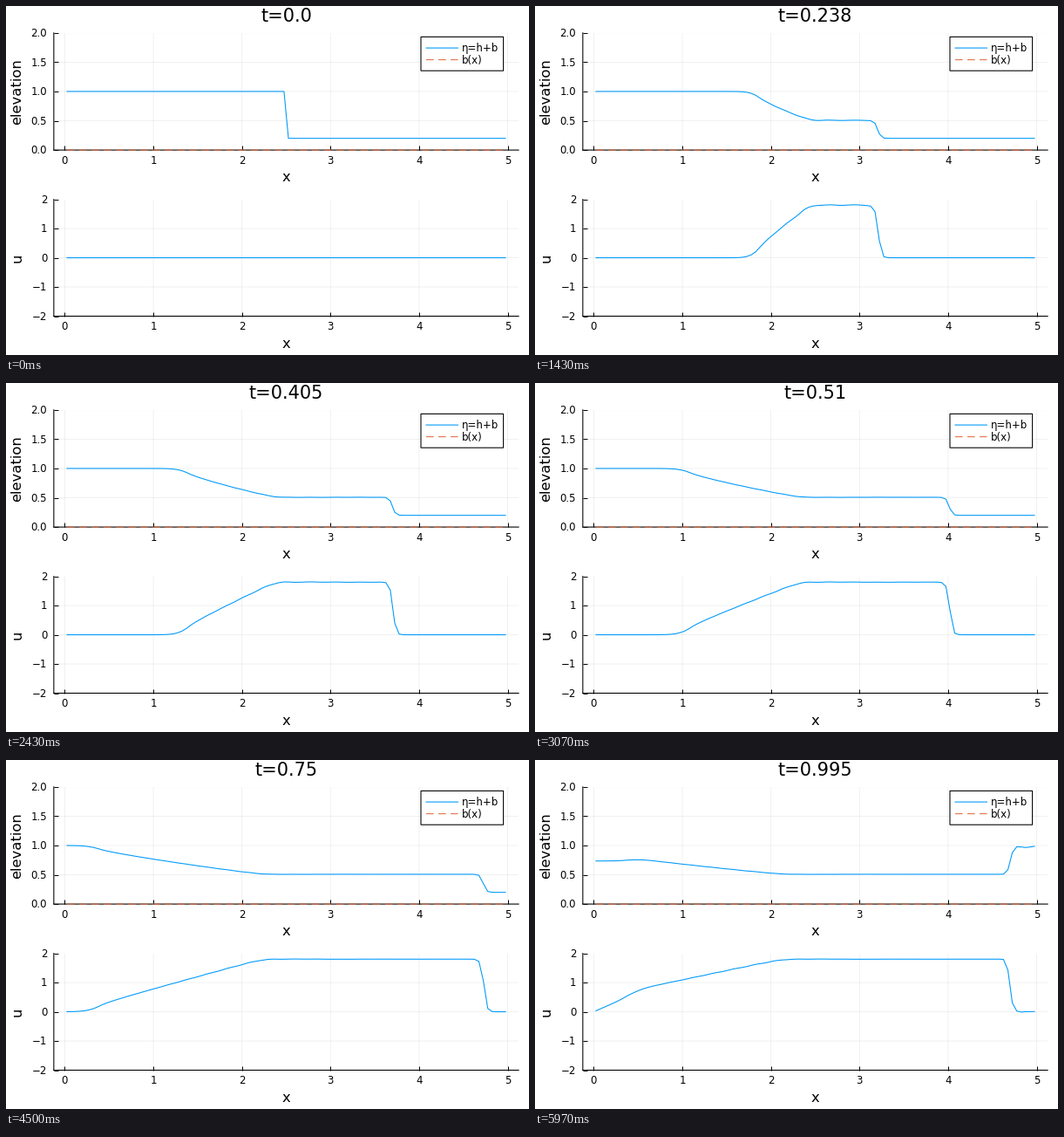
Write a matplotlib script that moves like this. It is 600 px wide and 400 px high and loops after 6010 ms.

```python
import numpy as np
import matplotlib.pyplot as plt
from matplotlib.animation import FuncAnimation
from matplotlib.patches import Rectangle

W, H, DPI = 600, 400, 100
FRAMES, LOOP_MS = 180, 6010
G, CFL, N, LENGTH = 9.81, 0.45, 100, 5.0
BLUE, ORANGE, DASH = "#009AFA", "#E36F47", (8, 5)
PX = 72 / DPI
LINE = 1.08 * PX
TICK, LABEL, TITLE = 11.8 * PX, 16.4 * PX, 20.9 * PX
LEFT, RIGHT = 54.85, 588.1

plt.rcParams["font.family"] = "DejaVu Sans"
dx = LENGTH / N
x = (np.arange(N) + 0.5) * dx


def minmod(a, b):
    return np.where(a * b > 0, np.sign(a) * np.minimum(abs(a), abs(b)), 0)


def flux(q):
    h, m = q
    return np.array([m, m * m / h + 0.5 * G * h * h])


def pad(q):
    """Two mirrored ghost cells behind each wall."""
    wall = np.array([[1], [-1]])
    return np.hstack([wall * q[:, 1::-1], q, wall * q[:, :-3:-1]])


def rate(q):
    """Central-upwind finite volumes with minmod slopes."""
    p = pad(q)
    d = np.diff(p)
    half = 0.5 * minmod(d[:, :-1], d[:, 1:])
    c = p[:, 1:-1]
    left, right = (c + half)[:, :-1], (c - half)[:, 1:]
    ul, ur = left[1] / left[0], right[1] / right[0]
    cl, cr = np.sqrt(G * left[0]), np.sqrt(G * right[0])
    ap = np.maximum(np.maximum(ul + cl, ur + cr), 0)
    am = np.minimum(np.minimum(ul - cl, ur - cr), 0)
    f = (ap * flux(left) - am * flux(right) + ap * am * (right - left)) / (ap - am)
    return -np.diff(f) / dx


def solve():
    """Dam break in a closed basin, one Euler step per frame."""
    q = np.array([np.where(x < LENGTH / 2, 1.0, 0.2), np.zeros(N)])
    t, states = 0.0, [(0.0, q)]
    for _ in range(FRAMES - 1):
        speed = np.max(abs(q[1] / q[0]) + np.sqrt(G * q[0]))
        dt = min(CFL * dx / speed, 1 - t)
        q = q + dt * rate(q)
        t += dt
        states.append((t, q))
    return states


states = solve()
fig = plt.figure(figsize=(W / DPI, H / DPI), dpi=DPI, facecolor="white")


def text(px, py, s, size, **kw):
    return fig.text(px / W, 1 - py / H, s, fontsize=size, **kw)


def panel(top, bottom, lo, hi, step, fmt, name):
    ax = fig.add_axes([LEFT / W, 1 - bottom / H, (RIGHT - LEFT) / W, (bottom - top) / H])
    ax.set_xlim(-0.1235, 5.1235)
    ax.set_ylim(lo, hi)
    ax.set_xticks(range(6))
    ax.set_yticks(np.arange(lo, hi + step / 2, step))
    ax.tick_params(direction="in", length=5 * PX, width=PX, labelleft=False, labelbottom=False)
    ax.grid(color="black", alpha=0.1, lw=0.55 * PX, snap=False)
    ax.set_axisbelow(True)
    for side, spine in ax.spines.items():
        spine.set(linewidth=LINE, visible=side in ("left", "bottom"), zorder=1.5, snap=False)
    for v in range(6):
        px = LEFT + (v + 0.1235) / 5.247 * (RIGHT - LEFT)
        text(px, bottom + 15.6, str(v), TICK, ha="center")
    for v in ax.get_yticks():
        py = bottom - (v - lo) / (hi - lo) * (bottom - top)
        text(47.2, py + 4.3, fmt(v), TICK, ha="right")
    text((LEFT + RIGHT) / 2, bottom + 36.2, "x", LABEL, ha="center")
    text(17.3, (top + bottom) / 2, name, LABEL, rotation=90, rotation_mode="anchor",
         ha="center", va="baseline")
    return ax


def curve(ax, **kw):
    line, = ax.plot(x, 0 * x, lw=LINE, snap=False, zorder=3, **kw)
    return line


def legend(ax):
    kw = dict(transform=None, zorder=5, snap=False)
    ax.add_patch(Rectangle((476, H - 74.2), 94.6, 38.8, fc="white", ec="black", lw=LINE, **kw))
    for y, s, style in ((48.1, "η=h+b", dict(color=BLUE)),
                        (61.6, "b(x)", dict(color=ORANGE, dashes=DASH))):
        ax.plot([482, 518.5], [H - y, H - y], lw=LINE, **style, **kw)
        text(523, y + 4.2, s, TICK, zorder=6)


ax_top = panel(30.8, 165.1, 0, 2, 0.5, "{:.1f}".format, "elevation")
ax_low = panel(221.6, 355.5, -2, 2, 1, lambda v: f"{v:.0f}".replace("-", "−"), "u")
surface = curve(ax_top, color=BLUE)
curve(ax_top, color=ORANGE, dashes=DASH, clip_on=False)
velocity = curve(ax_low, color=BLUE)
legend(ax_top)
title = text((LEFT + RIGHT) / 2, 18, "", TITLE, ha="center")


def update(i):
    t, (h, m) = states[i]
    surface.set_ydata(h)
    velocity.set_ydata(m / h)
    title.set_text(f"t={float(round(t, 3))}")
    return surface, velocity, title


anim = FuncAnimation(fig, update, frames=FRAMES, interval=LOOP_MS / FRAMES, repeat=True, repeat_delay=0)
plt.show()
```
